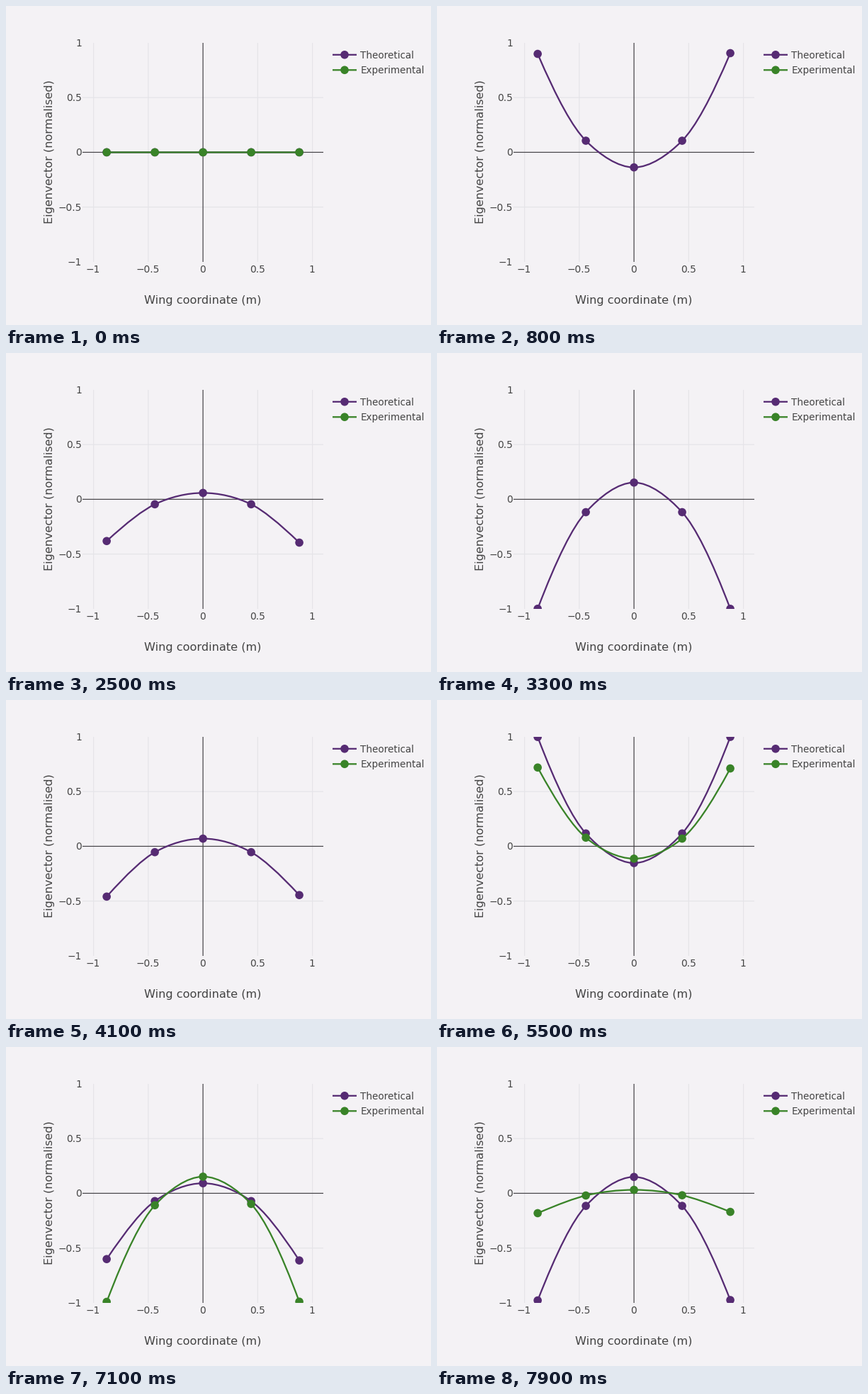
Animation of 600x450 px, one loop 8 s. Source, as a matplotlib script:

```python
import numpy as np
import matplotlib.pyplot as plt
from matplotlib.animation import FuncAnimation
from matplotlib.patches import Circle, PathPatch, Rectangle
from matplotlib.path import Path

W, H, DPI = 600, 450, 100
FRAMES, STEP = 80, 100
PX = 72 / DPI                       # points per pixel

X0, Y0, UNIT = 278.1, 206.4, 154.5  # plot origin and pixels per data unit
LEFT, RIGHT, TOP, BOTTOM = 108, 448, 52, 361
LINE, DOT = 2.27, 5.8               # trace width and marker radius

BG, GRID, AXIS, INK = "#f4f2f5", "#e5e4e8", "#49474b", "#444444"
PURPLE, GREEN = "#562b73", "#398328"

STATIONS = np.array([-0.88, -0.44, 0, 0.44, 0.88])

# Mode shapes: amplitude and phase lead at each station, and angular speed
THEORY = dict(amp=np.array([1, 0.1175, -0.153, 0.1175, 1]),
              lead=np.array([0, 0.005, 0.0, 0.005, 0.0155]),
              omega=1.421, shift=-0.02)
MEASURED = dict(amp=np.array([1, 0.11, -0.153, 0.098, 1]),
                lead=np.array([0, 0, -0.025, 0, 0.012]),
                omega=1.5676, shift=0.0)
MEASURED_START = 5.5                # seconds

plt.rcParams["font.family"] = "DejaVu Sans"
fig = plt.figure(figsize=(W / DPI, H / DPI), dpi=DPI, facecolor=BG)
ax = fig.add_axes([0, 0, 1, 1])
ax.set_xlim(0, W)
ax.set_ylim(H, 0)
ax.axis("off")


def px(x):
    return X0 + UNIT * x


def py(y):
    return Y0 - UNIT * y


def rule(xs, ys, color, width, z):
    ax.plot(xs, ys, color=color, lw=width * PX, zorder=z,
            solid_capstyle="butt", snap=False)


def label(x, y, text, size, ha="center", **kw):
    ax.text(x, y, text, fontsize=size * PX, color=INK, ha=ha,
            va="baseline", **kw)


def dot(x, y, color, z):
    return ax.add_patch(Circle((x, y), DOT, color=color, lw=0, zorder=z))


def draw_axes():
    names = {-1: "−1", -0.5: "−0.5", 0: "0", 0.5: "0.5", 1: "1"}
    for v, name in names.items():
        if v and abs(v) < 1:
            rule([LEFT, RIGHT], [py(v)] * 2, GRID, 1.2, 1)
        if v:
            rule([px(v)] * 2, [TOP, BOTTOM], GRID, 1.2, 1)
        label(px(v) - 0.6, 376, name, 13.8)
        label(106.8, py(v) + 4.9, name, 13.8, ha="right")
    rule([LEFT, RIGHT], [py(0)] * 2, AXIS, 1.25, 2)
    rule([px(0)] * 2, [TOP, BOTTOM], AXIS, 1.25, 2)
    label(277.7, 420.3, "Wing coordinate (m)", 16.15)
    label(65.8, 205.4, "Eigenvector (normalised)", 16.05,
          rotation=90, rotation_mode="anchor")


def draw_legend():
    for y, name, color in ((68.8, "Theoretical", PURPLE),
                           (90.3, "Experimental", GREEN)):
        rule([461, 495], [y, y], color, LINE, 3)
        dot(478, y, color, 4)
        label(500.2, y + 5, name, 13.55, ha="left")


def spline(pts):
    """Open centripetal Catmull-Rom curve with quadratic end pieces."""
    verts, codes = [pts[0]], [Path.MOVETO]
    out = None
    for a, p, b in zip(pts, pts[1:], pts[2:]):
        d1, d2 = a - p, b - p
        r1, r2 = np.sqrt(np.hypot(*d1)), np.sqrt(np.hypot(*d2))
        t = (r2 * r2 * d1 - r1 * r1 * d2) / (3 * (r1 + r2))
        into = p + t / r2
        if out is None:
            verts += [into, p]
            codes += [Path.CURVE3] * 2
        else:
            verts += [out, into, p]
            codes += [Path.CURVE4] * 3
        out = p - t / r1
    verts += [out, pts[-1]]
    codes += [Path.CURVE3] * 2
    return Path(verts, codes)


class Trace:
    def __init__(self, mode, color, z):
        self.mode = mode
        clip = Rectangle((LEFT, TOP), RIGHT - LEFT, BOTTOM - TOP,
                         transform=ax.transData)
        self.curve = PathPatch(Path([(0, 0), (0, 0)]), fill=False,
                               edgecolor=color, lw=LINE * PX, zorder=z,
                               capstyle="butt", snap=False)
        ax.add_patch(self.curve)
        self.dots = [dot(0, 0, color, z + 0.5) for _ in STATIONS]
        self.parts = [self.curve, *self.dots]
        for part in self.parts:
            part.set_clip_path(clip)

    def pose(self, t, visible=True):
        m = self.mode
        phase = m["omega"] * t + m["shift"] + m["lead"]
        y = m["amp"] * np.sin(phase) if t > 0 else np.zeros(5)
        pts = np.column_stack([px(STATIONS), py(y)])
        self.curve.set_path(spline(pts))
        for d, p in zip(self.dots, pts):
            d.center = p
        for part in self.parts:
            part.set_visible(visible)


draw_axes()
draw_legend()
theory = Trace(THEORY, PURPLE, 5)
measured = Trace(MEASURED, GREEN, 6)


def update(i):
    t = i * STEP / 1000
    theory.pose(t)
    measured.pose(t, visible=i == 0 or t >= MEASURED_START)
    return theory.parts + measured.parts


anim = FuncAnimation(fig, update, frames=FRAMES, interval=STEP,
                     init_func=lambda: update(0), repeat=True,
                     repeat_delay=0, blit=False)
plt.show()
```
